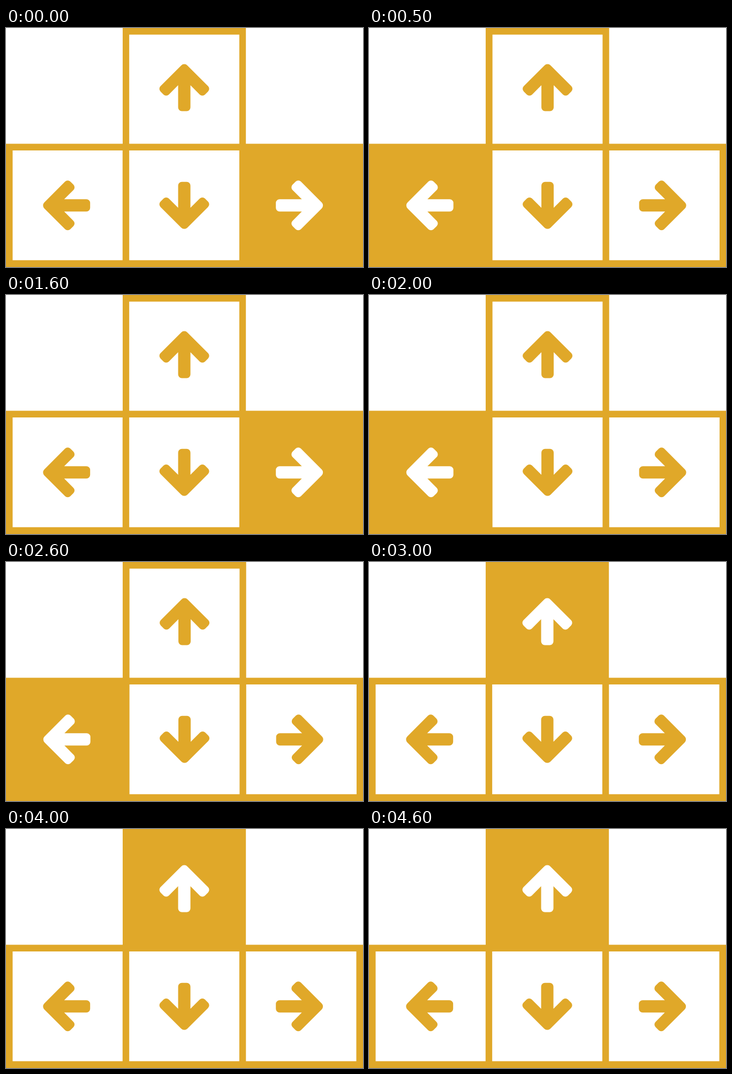
Write an HTML page with a canvas that moves like this. It is 667 px wide and 447 px high and loops after 5000 ms.

```html
<!DOCTYPE html>
<html lang="en">
<head>
<meta charset="utf-8">
<title>Arrow keys</title>
<style>
  html, body { margin: 0; width: 100%; height: 100%; overflow: hidden; background: #fff; }
  canvas { display: block; width: 667px; height: 447px; }
</style>
</head>
<body>
<canvas id="stage"></canvas>
<script>
const W = 667, H = 447, LOOP = 5000;
const GOLD = '#e0a829', WHITE = '#fff';

const canvas = document.getElementById('stage');
const ctx = canvas.getContext('2d');
const ratio = window.devicePixelRatio || 1;
canvas.width = Math.round(W * ratio);
canvas.height = Math.round(H * ratio);

// face: x, y, width, height; arrow: centre x, centre y, quarter turns
const keys = {
  up:    { face: [230.2, 12.4, 205.7, 204.1], arrow: [333.1, 111.6, 0] },
  right: { face: [448.3, 229, 206.2, 205.3],  arrow: [548.2, 331.8, 1] },
  down:  { face: [230.2, 229, 205.7, 205.3],  arrow: [333.1, 331.8, 2] },
  left:  { face: [12.4, 229, 205.4, 205.3],   arrow: [113.2, 331.8, 3] }
};

// start time, pressed key, horizontal nudge
const steps = [
  [0, 'right', 0],
  [500, 'left', 0.5],
  [1000, 'right', 0],
  [2000, 'left', 0.5],
  [3000, 'up', 0],
  [3500, 'down', 0],
  [4000, 'up', 0]
];

// left half of an upward arrow: x, y, corner radius
const half = [[-11.5, 44, 7], [-11.5, -4.5, 0], [-33.8, 17.8, 7], [-49.4, 2.1, 7]];
const mirrored = half.map(([x, y, r]) => [-x, y, r]).reverse();
const outline = [...half, [0, -47.3, 8], ...mirrored];

function drawArrow([x, y, turns], color) {
  ctx.save();
  ctx.translate(x, y);
  ctx.rotate(turns * Math.PI / 2);
  ctx.beginPath();
  ctx.moveTo(0, 44);
  outline.forEach(([px, py, r], i) => {
    const next = outline[i + 1] || [0, 44];
    ctx.arcTo(px, py, next[0], next[1], r);
  });
  ctx.closePath();
  ctx.fillStyle = color;
  ctx.fill();
  ctx.restore();
}

function draw(time) {
  const [, pressed, nudge] = steps.filter(step => step[0] <= time).pop();
  ctx.setTransform(ratio, 0, 0, ratio, 0, 0);
  ctx.fillStyle = WHITE;
  ctx.fillRect(0, 0, W, H);
  ctx.fillStyle = GOLD;
  ctx.fillRect(218, 0, 230.2 + nudge, 217);
  ctx.fillRect(0, 216.5, W, H);

  ctx.translate(nudge, 0);
  for (const [name, key] of Object.entries(keys)) {
    const active = name === pressed;
    if (!active) {
      ctx.fillStyle = WHITE;
      ctx.fillRect(...key.face);
    }
    drawArrow(key.arrow, active ? WHITE : GOLD);
  }
}

const start = performance.now();
function tick() {
  draw((performance.now() - start) % LOOP);
  requestAnimationFrame(tick);
}
tick();
</script>
</body>
</html>
```
